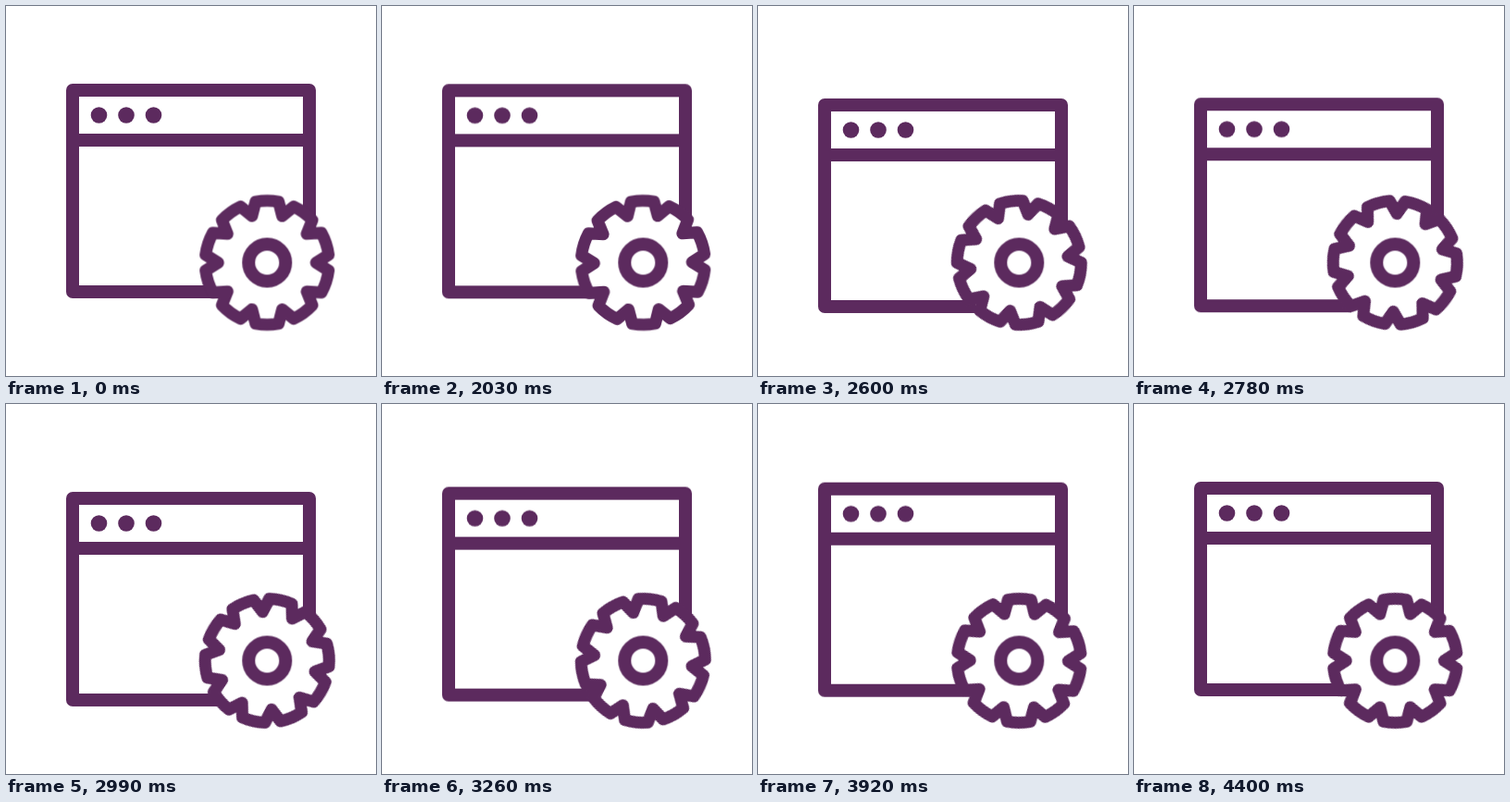
Write an HTML page that moves like this. It is 400 by 400 pixels and loops after 4.46 s.

```html
<!DOCTYPE html>
<html lang="en">
<head>
<meta charset="utf-8">
<title>Window and gear</title>
<style>
  html, body { margin: 0; width: 100%; height: 100%; overflow: hidden; background: #fff; }
  svg { display: block; width: 100%; height: 100%; }
  .line { fill: none; stroke: #5c2a5e; stroke-width: 14; stroke-linejoin: round; }
  .dot { fill: #5c2a5e; }
  #teeth { fill: #fff; stroke-width: 13; }
  #window { animation: dip 4460ms infinite; }
  #teeth { animation: turn 4460ms infinite; }

  @keyframes dip {
    0% { transform: translateY(0); }
    45.4% { transform: translateY(0); animation-timing-function: cubic-bezier(.333, .667, .667, 1); }
    58.86% { transform: translateY(16px); animation-timing-function: cubic-bezier(.26, 0, .14, 1); }
    99.2%, 100% { transform: translateY(0); }
  }
  /* Two tooth pitches, so the loop closes seamlessly */
  @keyframes turn {
    0% { transform: rotate(0deg); }
    45.4% { transform: rotate(0deg); animation-timing-function: cubic-bezier(.3, 1, .6, 1); }
    99.2%, 100% { transform: rotate(-72deg); }
  }
</style>
</head>
<body>
<svg viewBox="0 0 400 400">
  <g id="window">
    <path class="line" d="M328 236V91H72V309H235M72 145H328"/>
    <circle class="dot" cx="100.5" cy="118" r="8.8"/>
    <circle class="dot" cx="130" cy="118" r="8.8"/>
    <circle class="dot" cx="159.5" cy="118" r="8.8"/>
  </g>
  <g transform="translate(282.3 277.5)">
    <path class="line" id="teeth"/>
    <circle class="line" r="20"/>
  </g>
</svg>
<script>
  const TEETH = 10, PITCH = 360 / TEETH, HALF = 10.7, OUTER = 67, NOTCH = 53;

  const polar = (deg, r) => {
    const a = deg * Math.PI / 180;
    return `${(r * Math.sin(a)).toFixed(2)} ${(-r * Math.cos(a)).toFixed(2)}`;
  };

  let d = '';
  for (let i = 0; i < TEETH; i++) {
    const mid = i * PITCH;
    d += `${i ? 'L' : 'M'}${polar(mid - HALF, OUTER)}` +
         `A${OUTER} ${OUTER} 0 0 1 ${polar(mid + HALF, OUTER)}` +
         `L${polar(mid + PITCH / 2, NOTCH)}`;
  }
  document.getElementById('teeth').setAttribute('d', d + 'Z');
</script>
</body>
</html>
```
